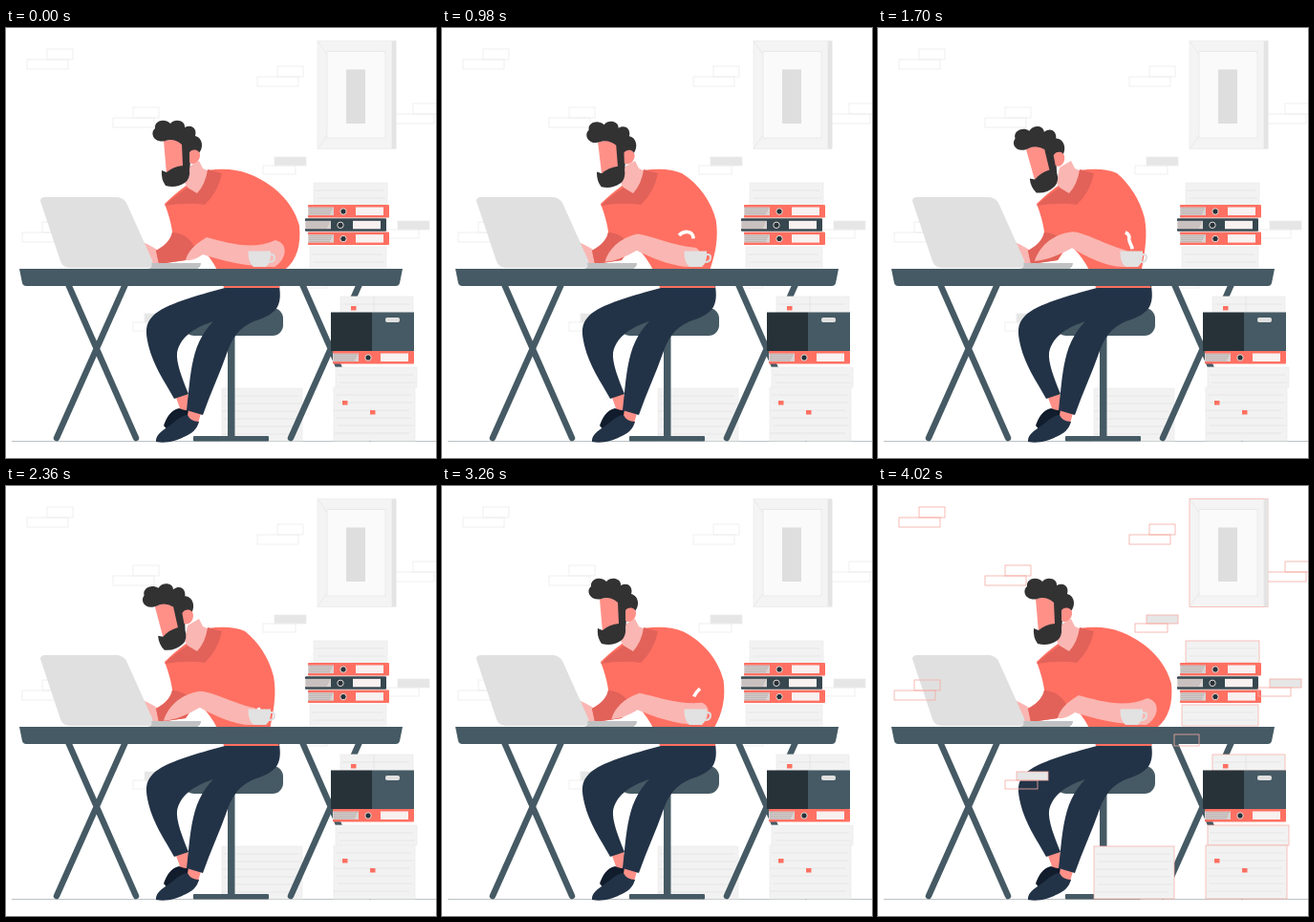
Animation of 450x450 px, one loop 4.04 s. Source, as an HTML page:

```html
<!DOCTYPE html>
<html lang="en">
<head>
<meta charset="utf-8">
<title>Working at the desk</title>
<style>
html, body { margin: 0; width: 100%; height: 100%; overflow: hidden; background: #fff; }
svg { display: block; width: 100%; height: 100%; --line: #ebebeb; }
svg.lit { --line: #f6aaa2; }
.brick { fill: none; stroke: var(--line); stroke-width: .8; }
.solid { fill: #e6e6e6; }
.paper { fill: #f2f2f2; stroke: var(--line); stroke-width: .7; }
.sheet { stroke: #e0e0e0; stroke-width: .7; }
.steel { fill: #455a64; }
.leg { fill: none; stroke: #455a64; stroke-width: 6.5; stroke-linecap: round; }
.navy { fill: #233347; }
.coral { fill: #ff7062; }
.shade { fill: #e26259; }
.skin { fill: #ff9088; }
.pale { fill: #fab6b2; }
.hair { fill: #323233; }
.wisp { fill: none; stroke: #fff; stroke-width: 3.6; }
</style>
</head>
<body>
<svg id="stage" viewBox="0 0 450 450">
  <path d="M6 432.500H450" stroke="#8d979c" stroke-width=".6"/>
  <g id="room">
    <g id="bricks"></g>
    <g stroke="#e4e4e4" stroke-width=".7">
      <rect x="326" y="13.500" width="82" height="113" fill="#f4f4f4" style="stroke: var(--line)"/>
      <path d="M326 13.500L397 115M326 126.500L397 24.500" stroke="#e4e4e4"/>
      <rect x="336" y="24.500" width="61" height="90.500" fill="#fafafa"/>
      <path d="M404 14H408V126H404Z" fill="#e4e4e4"/>
    </g>
    <rect x="356" y="43.500" width="20" height="56.500" fill="#dedede"/>
    <g id="low"></g>
  </g>

  <g id="front">
    <g id="legs"></g>
    <g class="steel">
      <rect x="186" y="293" width="104" height="29" rx="11"/>
      <rect x="232" y="318" width="7.500" height="110"/>
      <rect x="196" y="427" width="79" height="5.500" rx="1"/>
    </g>

    <path class="skin" d="M177 384L190 381L193 400L183 401Z"/>
    <path d="M165 416C168 408 172 400 181 398Q188 401 195 400L193 412L170 422Z" fill="#111c2c"/>
    <path class="navy" d="M229 272C200 280 166 289 154 301C145 310 146 319 149 332C154 353 166 370 176 388L191 383C184 366 178 350 179 340C182 325 194 314 220 306L258 271Z"/>
    <path class="skin" d="M191 399L204 403L201 414L189 412Z"/>
    <path class="navy" d="M157 433C156 425 166 420 174 414C181 408 186 405 190 405Q193 412 202 412C200 420 194 425 186 428C178 432 168 435 157 433Z"/>
    <path class="navy" d="M228 273L262 270H286C289 290 284 299 262 306C244 313 238 323 232 338C224 361 214 382 206 405L189 400C191 384 192 364 196 347C200 329 208 314 224 300Z"/>

    <path class="pale" d="M139 223C147 225 153 229 160 233L161 247H149Z"/>
    <path id="torso" class="coral"/>
    <path class="shade" d="M160 247L157 233C166 228 172 222 174 214Q188 214 197 228L188 243Z"/>
    <path id="arm" class="pale"/>
    <path class="pale" d="M190 146L202 139L206 147L213 150Q209 163 200 174Q191 171 187 162Z"/>
    <path class="shade" d="M211 148L226 152Q222 172 208 185Q190 182 166 186Q176 176 190 167L200 173Q209 163 211 148Z"/>

    <g id="head">
      <path class="skin" d="M165 118L186 115L191 147L168 153Z"/>
      <path class="hair" d="M167 118C155 121 150 110 156 105C155 97 166 94 172 100C177 94 188 97 187 104C196 100 200 107 198 113C206 115 207 125 202 131L194 133L192 148Q193 158 187 162Q178 168 167 165Q162 158 163 149L168 151Q175 145 185 144L184 122Q176 115 167 118Z"/>
      <path class="skin" d="M192 130C196 125 204 128 203 134C202 141 196 144 192 141Z"/>
    </g>

    <path d="M36 181Q36 177 41 177H117Q123 178 126 183L153 243Q155 250 149 251H66Q59 250 57 244Z" fill="#e0e0e0"/>
    <path d="M152 246H204Q204 250 200 252H149Q154 250 152 246Z" fill="#bfc1c3"/>

    <g id="steam"></g>
    <path d="M275 237H278Q281 237 281 240Q281 245 275 245" fill="none" stroke="#dedede" stroke-width="2"/>
    <path d="M253.500 233.500H277Q278 245 272 250H259Q253 245 253.500 233.500Z" fill="#e2e2e2"/>

    <path class="steel" d="M14 252H415L412 267Q411 270 408 270H21Q18 270 17 267Z"/>
    <g id="piles"></g>
  </g>
</svg>

<script>
const $ = id => document.getElementById(id);
const LOOP = 4040;
const CORAL = '#ff7062', DARK = '#37474f';

const rect = (x, y, w, h, attr) =>
  `<rect x="${x}" y="${y}" width="${w}" height="${h}" ${attr}/>`;
const line = (d, attr) => `<path d="${d}" ${attr}/>`;

// Two bricks, the lower one shifted to the left.
const outlined = (x, y) =>
  rect(x, y, 27, 11, 'class="brick"') + rect(x - 21, y + 11, 43, 10, 'class="brick"');
const filled = (x, y) =>
  rect(x, y, 33, 9, 'class="brick solid"') + rect(x - 12, y + 9, 34, 9, 'class="brick"');

$('bricks').innerHTML =
  outlined(43, 22) + outlined(133, 83) + outlined(284, 40) + outlined(426, 79) + outlined(38, 203) +
  filled(281, 135) + filled(410, 202) + filled(145, 299) +
  rect(310, 260, 26, 12, 'class="brick"');

function papers(x, y, w, h) {
  let s = rect(x, y, w, h, 'class="paper"');
  for (let k = 1; k * 8 < h - 2; k++) {
    s += line(`M${x + k % 3 * 2} ${y + k * 8}h${w - 6}`, 'class="sheet"');
  }
  return s;
}

function binder(x, y, color) {
  let s = rect(x, y, 85, 13.5, `rx="1" fill="${color}"`);
  s += rect(x, y + 2.5, 27, 8.5, 'fill="#d9d2d1"');
  for (let k = 0; k < 4; k++) {
    s += line(`M${x + 1} ${y + 3.7 + k * 2}h${25 - k}`, 'stroke="#a39796" stroke-width=".6"');
  }
  s += `<circle cx="${x + 37}" cy="${y + 7}" r="3.2" fill="#263238" stroke="#e8dedc"/>`;
  return s + rect(x + 50, y + 2.5, 29, 8.5, 'fill="#f8f1f0"');
}

$('low').innerHTML = papers(226, 377, 84, 55);

const tab = (x, y) => rect(x, y, 5.5, 4.5, `fill="${CORAL}"`);
let piles = papers(322, 162, 77, 23) + papers(318, 229, 80, 22);
for (let k = 0; k < 3; k++) {
  piles += binder(316 - k % 2 * 3, 185 + k * 14.3, k % 2 ? DARK : CORAL);
}
$('piles').innerHTML = piles +
  papers(350, 281, 76, 17) + line('M385 281V298', 'class="sheet"') +
  rect(340, 297.5, 43, 40.5, 'fill="#263238"') +
  rect(383, 297.5, 44, 40.5, 'fill="#455a64"') +
  rect(397, 303, 15, 5, 'rx="2" fill="#e0e0e0"') +
  binder(342, 338, CORAL) +
  papers(345, 355, 85, 21) + papers(343, 376, 85, 56) +
  tab(361, 291) + tab(352, 390) + tab(381, 400);

$('legs').innerHTML = [65, 310].map(x =>
  line(`M${x} 268L${x + 71} 429M${x + 60} 268L${x - 12} 429`, 'class="leg"')).join('');

// Smooth rise from 0 to 1 between two times.
function ease(t, from, to) {
  const k = Math.min(1, Math.max(0, (t - from) / (to - from)));
  return k * k * (3 - 2 * k);
}

// Blends two path strings with the same commands.
function mix(a, b, k) {
  const to = b.match(/-?[\d.]+/g);
  let i = 0;
  return a.replace(/-?[\d.]+/g, n => (+n + (to[i++] - n) * k).toFixed(2));
}

const chest = 'L286 272L228 272Q221 245 200 226L188 243L160 247L157 233C168 227 173 221 174 213C172 200 169 192 166 184C180 170 195 160 211 149Z';
const torso = [
  'M211 149C225 147 240 147 255 153C285 165 302 187 307 207C309 227 304 243 293 252' + chest,
  'M211 149C225 147 239 147 250 152C263 163 274 179 279 199C282 216 280 231 276 252' + chest
];
const arm = [
  'M188 243C190 234 198 226 210 219C232 225 259 233 282 222C297 226 293 243 281 250C250 250 225 243 206 237C200 241 194 244 188 243Z',
  'M164 245C168 232 180 217 203 214C218 215 232 225 260 233C264 238 263 246 258 250C240 251 216 239 203 231C190 238 178 244 164 245Z'
];

const wisps = [
  'M267 236C267 228 261 223 263 219C262 213 254 211 248 217',
  'M266 237C262 228 260 221 270 212'
];
const puffs = [0, 0, 1].map((kind, i) => ({ kind, start: 110 + i * 1050 }));
$('steam').innerHTML = puffs.map(p =>
  line(wisps[p.kind], 'class="wisp" pathLength="1"')).join('');
puffs.forEach((p, i) => p.el = $('steam').children[i]);

// Shows the part of a wisp between its tail and its tip.
function drift({ el, start }, t) {
  const age = t - start;
  const tip = Math.min(1, age / 800);
  const tail = Math.max(0, (age - 400) / 1050);
  el.style.display = age > 0 && age < 1200 ? '' : 'none';
  el.setAttribute('stroke-dasharray', `0 ${tail} ${Math.max(0, tip - tail)} 2`);
}

const stage = $('stage'), room = $('room'), front = $('front');
let wasLit = false;

function draw(t) {
  const lean = ease(t, 0, 1500) - .55 * ease(t, 2300, 2680) - .45 * ease(t, 3200, 4000);
  const nod = ease(t, 740, 1640) - ease(t, 2180, 3140);
  $('torso').setAttribute('d', mix(...torso, lean));
  $('arm').setAttribute('d', mix(...arm, lean));
  const tap = Math.max(0, lean - .9) * 8 * Math.sin(t / 65);
  $('arm').setAttribute('transform', `rotate(${tap} 256 242)`);
  $('head').setAttribute('transform', `rotate(${-11 * nod} 205 175)`);
  puffs.forEach(p => drift(p, t));

  // The room comes to the front for the last moment of the loop.
  const lit = t >= 4000;
  if (lit !== wasLit) {
    stage.classList.toggle('lit', lit);
    stage.insertBefore(room, lit ? null : front);
    wasLit = lit;
  }
}

const start = performance.now();
function tick() {
  draw((performance.now() - start) % LOOP);
  requestAnimationFrame(tick);
}
tick();
</script>
</body>
</html>
```
